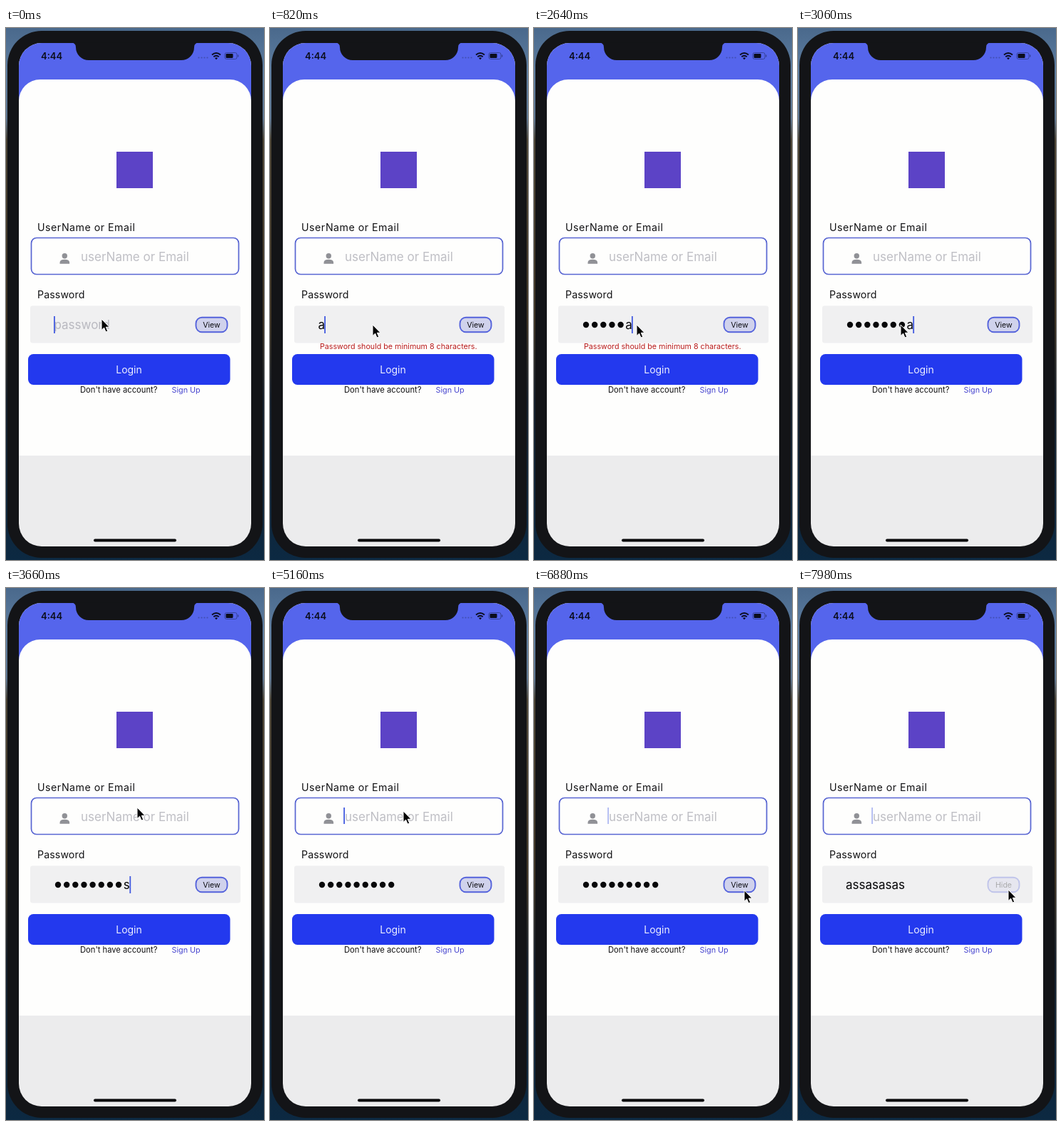
These frames come from a looping animation (362 by 744 pixels, 8000 ms). An HTML page:

```html
<!DOCTYPE html>
<html lang="en">
<head>
<meta charset="utf-8">
<title>Login form</title>
<style>
html, body { margin: 0; width: 100%; height: 100%; overflow: hidden; background: #0e1116; }
svg { display: block; width: 100%; height: 100%; font-family: Inter, Roboto, sans-serif; cursor: default; }
</style>
</head>
<body>
<svg viewBox="0 0 362 744" xmlns="http://www.w3.org/2000/svg">
  <defs>
    <linearGradient id="backdrop" x2="0" y2="1">
      <stop offset="0" stop-color="#4a698c"/>
      <stop offset=".08" stop-color="#5c7c9f"/>
      <stop offset=".17" stop-color="#5d7590"/>
      <stop offset=".21" stop-color="#4b4334"/>
      <stop offset=".55" stop-color="#3b3122"/>
      <stop offset=".7" stop-color="#141e2a"/>
      <stop offset="1" stop-color="#0c2942"/>
    </linearGradient>
    <clipPath id="screen"><rect x="18" y="21" width="326" height="704" rx="32"/></clipPath>
  </defs>

  <rect width="362" height="744" fill="url(#backdrop)"/>
  <rect x="2" y="4" width="358" height="737" rx="48" fill="#131417"/>

  <g clip-path="url(#screen)">
    <rect x="18" y="21" width="326" height="704" fill="#ececed"/>
    <rect x="18" y="21" width="326" height="100" fill="#5565ec"/>
    <path d="M18 598V102a30 30 0 0 1 30-30H314a30 30 0 0 1 30 30V598Z" fill="#fefefd"/>
  </g>
  <path d="M92 20.500Q98 21 98 27a18 18 0 0 0 18 18H246a18 18 0 0 0 18-18Q264 21 270 20.500Z" fill="#131417"/>

  <text x="49" y="43.500" font-size="13" font-weight="600" fill="#0b0d1c">4:44</text>
  <g fill="#4250b4">
    <circle cx="270.500" cy="41.500" r="1.100"/><circle cx="274.500" cy="41.500" r="1.100"/>
    <circle cx="278.500" cy="41.500" r="1.100"/><circle cx="282.500" cy="41.500" r="1.100"/>
  </g>
  <g fill="none" stroke="#0b0d1c" stroke-width="1.900">
    <path d="M289 37.600Q295 32.600 301 37.600M291.300 40.200Q295 37.200 298.700 40.200"/>
  </g>
  <path d="M293 42Q295 40.300 297 42L295 44.200Z" fill="#0b0d1c"/>
  <rect x="307" y="34.500" width="17" height="9" rx="2.500" fill="none" stroke="#37439a"/>
  <rect x="308.500" y="36" width="10" height="6" rx="1.200" fill="#0b0d1c"/>
  <path d="M325.700 37.500v3" stroke="#37439a" stroke-width="1.300"/>

  <rect x="155" y="173" width="51" height="51" fill="#5c43c6"/>

  <g font-size="14.200" letter-spacing=".5" fill="#121214">
    <text x="44" y="284">UserName or Email</text>
    <text x="44" y="378" letter-spacing=".1">Password</text>
  </g>

  <rect x="35.500" y="293.500" width="291" height="51" rx="7.500" fill="#fefefd" stroke="#5865d2" stroke-width="1.700"/>
  <g fill="#909196">
    <circle cx="82.300" cy="318.700" r="3.700"/>
    <path d="M75.500 329.700v-1.700q0-4.300 6.800-4.300t6.800 4.300v1.700Z"/>
  </g>
  <text x="105" y="325.500" font-size="17" fill="#bfbfc5">userName or Email</text>

  <rect x="34" y="388.500" width="295" height="52" rx="3" fill="#f0f0f1"/>
  <text id="hint" x="67.500" y="421" font-size="17" fill="#b9b9c0">password</text>
  <g id="dots" fill="#08080a"></g>
  <text id="typed" y="421" font-size="17" fill="#08080a"></text>
  <rect id="caret" width="1.800" fill="#435be0"/>

  <g id="button">
    <rect x="266.500" y="404.700" width="44" height="20.600" rx="8.500" fill="#d0d2ec" stroke="#5563dc" stroke-width="1.900"/>
    <text id="toggle" x="288.500" y="418.800" font-size="10.600" text-anchor="middle" fill="#0e0e12">View</text>
  </g>

  <text id="error" x="70" y="449" font-size="10.700" fill="#b91a1a">Password should be minimum 8 characters.</text>

  <rect x="31" y="456" width="283.500" height="43" rx="7.500" fill="#2339ee"/>
  <text x="172.500" y="482.500" font-size="14" text-anchor="middle" fill="#eceeff">Login</text>
  <text x="104" y="509.700" font-size="11.200" fill="#121214">Don't have account?</text>
  <text x="232.500" y="509.700" font-size="10.800" fill="#4745cf">Sign Up</text>

  <rect x="123" y="714.500" width="116" height="4" rx="2" fill="#060608"/>
  <path id="mouse" d="M0 0V15.500L3.600 12.200L6 18L8.700 16.900L6.300 11.300H11Z" fill="#050505" stroke="#fff" stroke-width="1" stroke-linejoin="round"/>
</svg>
<script>
const LOOP = 8000;
const SECRET = "assasasas";
const FIRST_KEY = 640, KEY_GAP = 345;
const MASK_DELAY = 900;
const FOCUS_USER = 4080;
const LEFT = 67, SLOT = 12.15;

// The button is clicked once, then pressed again as the loop ends.
const CLICKS = [{ press: 7040, release: 7180 }, { press: 7840, release: LOOP }];
const REVEAL = CLICKS[0].release;

// time, x, y
const PATH = [
  [0, 134, 407], [120, 134, 407], [620, 144, 415], [3300, 144, 415],
  [3660, 184, 307], [3900, 187, 312], [5240, 187, 312],
  [5860, 275, 415], [6240, 295, 423], [7980, 295, 422]
];

const el = id => document.getElementById(id);
const [hint, dots, typed, caret, button, toggle, error, mouse] =
  ["hint", "dots", "typed", "caret", "button", "toggle", "error", "mouse"].map(el);

const clamp = v => Math.min(1, Math.max(0, v));
const ease = v => v * v * (3 - 2 * v);
const mix = (a, b, k) => a + (b - a) * k;
const show = (node, on) => node.setAttribute("visibility", on ? "visible" : "hidden");

const dotList = [...SECRET].map((_, i) => {
  const dot = document.createElementNS("http://www.w3.org/2000/svg", "circle");
  dot.setAttribute("cx", 73 + i * SLOT);
  dot.setAttribute("cy", 415);
  dot.setAttribute("r", 4.2);
  dots.append(dot);
  return dot;
});

function pointer(t) {
  let i = 0;
  while (i < PATH.length - 2 && t >= PATH[i + 1][0]) i++;
  const [a, b] = [PATH[i], PATH[i + 1]];
  const k = ease(clamp((t - a[0]) / (b[0] - a[0])));
  return [mix(a[1], b[1], k), mix(a[2], b[2], k)];
}

function blink(t) {
  const p = (t - 5860 + 11000) % 1100;
  if (p < 480) return 1;
  if (p < 620) return 1 - (p - 480) / 140;
  return clamp((p - 980) / 120);
}

// Draws the field and returns the x of its end.
function drawPassword(t) {
  const keys = Math.floor((t - FIRST_KEY) / KEY_GAP) + 1;
  const count = Math.min(SECRET.length, Math.max(0, keys));
  const lastKey = FIRST_KEY + (count - 1) * KEY_GAP;
  const shown = t >= REVEAL;
  const peek = count > 0 && t < Math.min(lastKey + MASK_DELAY, FOCUS_USER);
  const masked = shown ? 0 : count - (peek ? 1 : 0);

  show(hint, count === 0);
  show(error, count > 0 && count < 8);
  dotList.forEach((dot, i) => show(dot, i < masked));

  typed.textContent = shown ? SECRET : peek ? SECRET[count - 1] : "";
  typed.setAttribute("x", LEFT + masked * SLOT + (peek ? 0.5 : 0));
  return LEFT + masked * SLOT + (peek ? 9.2 : 0);
}

function drawCaret(t, passwordEnd) {
  const user = t >= FOCUS_USER;
  caret.setAttribute("x", user ? 103.2 : passwordEnd);
  caret.setAttribute("y", user ? 307 : 403);
  caret.setAttribute("height", user ? 23 : 24);
  const typing = t >= FIRST_KEY && t < FOCUS_USER;
  const fresh = t < 500 || (user && t < FOCUS_USER + 400);
  caret.setAttribute("opacity", typing || fresh ? 1 : mix(0.12, 1, blink(t)));
}

function drawButton(t) {
  const click = CLICKS.findLast(c => t >= c.press) || CLICKS[0];
  const down = ease(clamp((t - click.press) / 150));
  const up = ease(clamp((t - click.release) / 250));
  button.setAttribute("opacity", mix(mix(1, 0.3, down), 1, up));
  toggle.textContent = t >= REVEAL ? "Hide" : "View";
}

function draw(t) {
  drawCaret(t, drawPassword(t));
  drawButton(t);
  mouse.setAttribute("transform", `translate(${pointer(t).join(" ")})`);
}

const start = performance.now();
function tick(now) {
  draw(Math.max(0, now - start) % LOOP);
  requestAnimationFrame(tick);
}
draw(0);
requestAnimationFrame(tick);
</script>
</body>
</html>
```
